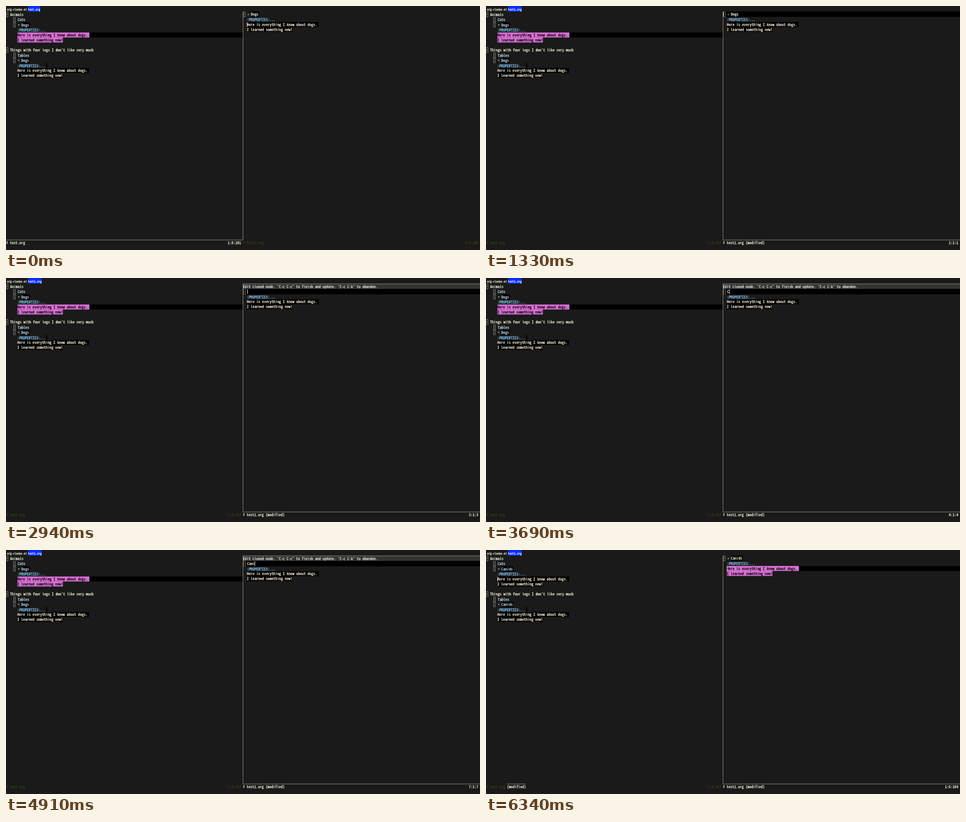
These frames come from a looping animation (1041x538 px, 8.28 s). An HTML page with a canvas:

```html
<!DOCTYPE html>
<html lang="en">
<head>
<meta charset="utf-8">
<title>Editing a cloned node</title>
<style>
html, body { margin: 0; width: 100%; height: 100%; overflow: hidden; background: #1a1a1a; }
canvas { display: block; }
</style>
</head>
<body>
<canvas id="stage" width="1041" height="538"></canvas>
<script>
const ctx = document.getElementById('stage').getContext('2d');
const LOOP = 8280, W = 1041, H = 538, SPLIT = 520, CELL = 4.165;
const FAMILY = '"Noto Sans Mono CJK JP", "Noto Sans Mono CJK SC", "Noto Sans Mono", monospace';
const C = {
  bg: '#1a1a1a', black: '#000', text: '#fff8dc', head2: '#c4e6f4', star: '#9cc4d4',
  prop: '#87cefa', pink: '#da70d6', line: '#95947c', box: '#8c8c80',
  dim: '#453612', tab: '#0030ff', header: '#333', headerText: '#e5e5e5', cursor: '#fff'
};

// Font size whose natural advance equals the wanted cell width.
function fontFor(cell) {
  ctx.font = `100px ${FAMILY}`;
  return `${cell / ctx.measureText('0').width * 100}px ${FAMILY}`;
}
const BODY = fontFor(CELL), TAB = fontFor(3.34);

function rect(x, y, w, h, color) {
  ctx.fillStyle = color;
  ctx.fillRect(x, y, w, h);
}

// The hairline stroke gives the light face a regular weight.
function write(str, x, mid, color, font = BODY) {
  ctx.font = font;
  ctx.fillStyle = ctx.strokeStyle = color;
  ctx.lineWidth = 0.3;
  ctx.fillText(str, x, mid + 3);
  ctx.strokeText(str, x, mid + 3);
}

function bullet(x, y, level) {
  ctx.strokeStyle = C.box;
  ctx.lineWidth = 0.9;
  ctx.strokeRect(x + 0.5, y, 4, 10.8);
  if (level === 1) {
    rect(x + 2, y + 5, 1, 1, C.text);
  } else {
    rect(x + 2, y + 3, 1, 1, C.head2);
    rect(x + 2, y + 7, 1, 1, C.head2);
  }
}

const cursor = (x, y) => rect(x, y, 1, 10, C.cursor);

// Clone mark and title of a cloned heading.
function cloneTitle(title, x, y, color, lit) {
  write('*', x + 1, y + 8.2, C.star);
  rect(x + 9, y, Math.round(title.length * CELL) + 1, 12, lit ? C.pink : C.black);
  write(title, x + 8.8, y + 6, lit ? C.black : color);
}

// Two body lines; lit = highlighted, full = current line runs to this x.
function note(x, y, lit, full) {
  if (full) rect(x, y, full - x, 11, C.black);
  const back = lit ? C.pink : C.black, fore = lit ? C.black : C.text;
  rect(x, y, 158, 11, back);
  rect(x, y + 11, 100, 11, back);
  write('Here is everything I know about dogs.', x, y + 5.5, fore);
  write('I learned something new!', x, y + 16.5, fore);
}

const drawer = (x, mid) => write(':PROPERTIES:...', x, mid, C.prop);

function modeLine(x, width, name, modified, pos, active) {
  const color = active ? C.text : C.dim;
  for (const y of [519, 521, 523]) rect(x + 1, y, 3, 1, color);
  write(name, x + 8.5, 522, color);
  write(pos, x + width - 3.8 - pos.length * CELL, 522, color);
  if (active) rect(x, 515.4, width, 1, C.line);
  if (modified) {
    const mx = x + 8.5 + (name.length + 1) * CELL;
    write('(modified)', mx, 522, C.text);
    if (!active) rect(Math.round(mx), 515.4, 41, 1, C.line);
  }
}

function tabs(current) {
  write('org-clones.el', 2.3, 6.5, C.text, TAB);
  rect(48, 0, current.length * 3.34 + 0.4, 12.4, C.tab);
  write(current, 48.3, 6.5, '#fff', TAB);
}

function leftPane(done, active) {
  const title = done ? 'Canids' : 'Dogs';
  bullet(0, 13, 1);
  write('Animals', 9, 18.5, C.text);
  bullet(16, 25, 2);
  write('Cats', 25.6, 30, C.head2);
  bullet(16, 36, 2);
  cloneTitle(title, 25, 36, C.head2);
  drawer(25, 53);
  note(25, 58.4, !done, done ? 0 : SPLIT);
  if (done) cursor(25, 59);

  bullet(0, 91.5, 1);
  write("Things with four legs I don't like very much", 9, 97, C.text);
  bullet(16, 103, 2);
  write('Tables', 25.6, 108.5, C.head2);
  bullet(16, 114.5, 2);
  cloneTitle(title, 25, 114, C.head2);
  drawer(25, 131.5);
  rect(88, 126, 3, 11, C.black);
  note(25, 136.6, false);
  modeLine(0, SPLIT, 'test.org', done, done ? '1:8:183' : '1:8:181', active);
}

function rightPane(t) {
  const active = t >= 1000, done = t >= 6340;
  const onTitle = t >= 1330 && !done, atEnd = t >= 1700 && !done;
  if (onTitle) rect(521, 12, W - 521, 12, C.black);
  bullet(521, 13, 1);
  cloneTitle(done ? 'Canids' : 'Dogs', 529, 12.4, C.text, atEnd);
  drawer(529, 29.5);
  note(529, 35.2, done, active && !onTitle ? W : 0);
  if (atEnd) cursor(555, 13);
  else if (onTitle) cursor(521, 13);
  else cursor(529, 36);
  const pos = done ? '1:6:164' : atEnd ? '7:1:7' : onTitle ? '1:1:1' : '1:6:162';
  modeLine(SPLIT, W - SPLIT, 'test1.org', t >= 1330, pos, active);
}

const KEYS = [3690, 4510, 4740, 4910, 5150, 5420];

function editPane(t) {
  const count = KEYS.filter(k => t >= k).length;
  rect(SPLIT, 13, W - SPLIT, 11, C.header);
  rect(SPLIT, 12.4, W - SPLIT, 1, C.line);
  write("Edit cloned node. 'C-c C-c' to finish and update. 'C-c C-k' to abandon.", 520.4, 19, C.headerText);
  rect(521, 24, W - 521, 12, C.black);
  bullet(521, 25, 1);
  write('Canids'.slice(0, count), 529.6, 30, C.text);
  if (t < 5460) cursor(Math.round(529.6 + count * CELL), 25);
  drawer(529, 41.5);
  note(529, 46.7, false);
  const col = 3 + count;
  modeLine(SPLIT, W - SPLIT, 'test1.org', true, `${col}:1:${col}`, true);
}

function draw(t) {
  ctx.textRendering = 'geometricPrecision';
  ctx.lineJoin = 'round';
  rect(0, 0, W, H, C.bg);
  tabs(t < 1000 ? 'test.org' : 'test1.org');
  leftPane(t >= 6340, t < 1000);
  if (t >= 2940 && t < 6340) editPane(t);
  else rightPane(t);
  rect(SPLIT, 12.4, 1, 503.6, C.line);
  if (t >= 1510 && t < 1700) write("This is a cloned node. 'C-c C-c' to edit it.", 0, 533, C.text);
}

const start = performance.now();
function tick() {
  draw((performance.now() - start) % LOOP);
  requestAnimationFrame(tick);
}
tick();
</script>
</body>
</html>
```
